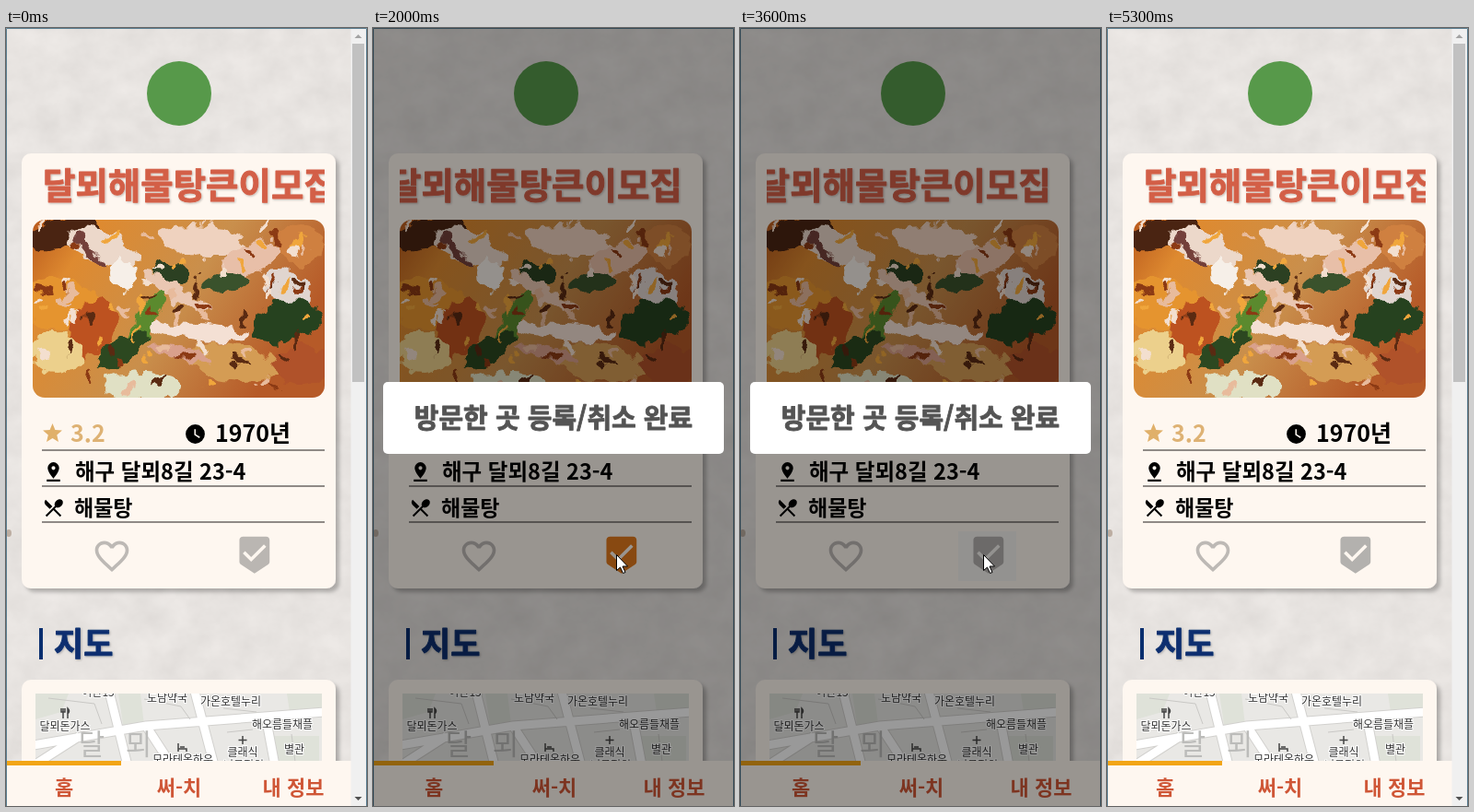
An HTML page for the animation above (5.4 s loop, 392 px wide and 844 px high).

```html
<!DOCTYPE html>
<html lang="ko">
<head>
<meta charset="utf-8">
<title>가게 정보</title>
<style>
  html, body { margin: 0; width: 100%; height: 100%; overflow: hidden; }
  svg { display: block; }
  text { font-family: "Noto Sans CJK KR", "Noto Sans CJK", "Noto Sans CJK JP", sans-serif; font-weight: 700; }
  .heavy { font-weight: 900; stroke: currentColor; fill: currentColor; stroke-width: .9px; stroke-linejoin: round; }
  .mid { text-anchor: middle; }
  .map text { font-size: 12px; font-weight: 500; text-anchor: middle; fill: #333; paint-order: stroke; stroke: #fff; stroke-width: 2px; }
  .map .district { font-size: 31px; font-weight: 400; fill: #bcbcba; stroke: none; }
  .tab { font-size: 22px; fill: #cf5636; }
  #modal { transform-origin: 196px 423px; }
</style>
</head>
<body>
<svg width="392" height="844" viewBox="0 0 392 844">
  <defs>
    <filter id="paper" x="0" y="0" width="1" height="1" color-interpolation-filters="sRGB">
      <feTurbulence type="fractalNoise" baseFrequency=".03 .035" numOctaves="5" seed="8"/>
      <feColorMatrix values=".07 0 0 0 .872  .07 0 0 0 .857  .07 0 0 0 .845  0 0 0 0 1"/>
    </filter>
    <filter id="soft" x="-.05" y="-.05" width="1.1" height="1.1" color-interpolation-filters="sRGB">
      <feTurbulence type="fractalNoise" baseFrequency=".07" numOctaves="2" seed="3"/>
      <feDisplacementMap in="SourceGraphic" scale="20" xChannelSelector="R" yChannelSelector="G"/>
      <feGaussianBlur stdDeviation=".7"/>
    </filter>
    <filter id="shade" x="-.1" y="-.1" width="1.2" height="1.2">
      <feDropShadow dx="4" dy="4" stdDeviation="2" flood-opacity=".25"/>
    </filter>
    <filter id="glow" x="-.1" y="-.2" width="1.2" height="1.5">
      <feDropShadow dx="1" dy="1" stdDeviation=".8" flood-opacity=".25"/>
    </filter>
    <linearGradient id="broth" x2="1" y2=".4">
      <stop stop-color="#b9591c"/><stop offset=".2" stop-color="#de8a30"/>
      <stop offset=".6" stop-color="#c98f4c"/><stop offset="1" stop-color="#b65a28"/>
    </linearGradient>
    <clipPath id="titleClip"><rect x="29" y="140" width="317" height="62"/></clipPath>
    <clipPath id="photoClip"><rect x="29" y="208" width="317" height="193" rx="13"/></clipPath>
    <clipPath id="mapClip"><rect x="32" y="722" width="311" height="122"/></clipPath>
  </defs>

  <rect width="392" height="844" filter="url(#paper)"/>
  <ellipse cx="3" cy="548" rx="3" ry="4" fill="#a08a78" opacity=".6"/>
  <circle cx="188" cy="71" r="35" fill="#57994a"/>

  <g fill="#fef7f0" filter="url(#shade)">
    <rect x="17" y="136" width="341" height="472" rx="10"/>
    <rect x="17" y="707" width="341" height="180" rx="10"/>
  </g>

  <g clip-path="url(#titleClip)">
    <text id="title" class="heavy" x="29" y="185" font-size="38.500" color="#d35f47" filter="url(#glow)">달뫼해물탕큰이모집</text>
  </g>

  <g clip-path="url(#photoClip)">
    <rect x="29" y="208" width="317" height="193" fill="url(#broth)"/>
    <g id="food" filter="url(#soft)"></g>
  </g>

  <g fill="#8f8a86">
    <rect x="39" y="457" width="307" height="2"/>
    <rect x="39" y="496" width="307" height="2"/>
    <rect x="39" y="535" width="307" height="2"/>
  </g>
  <g id="icons"></g>
  <text x="70" y="449" font-size="25" fill="#deb274">3.2</text>
  <text x="227" y="449" font-size="25">1970년</text>
  <text x="75" y="490" font-size="23.500">해구 달뫼8길 23-4</text>
  <text x="74" y="529" font-size="23">해물탕</text>

  <rect id="hover" x="237" y="546" width="63" height="54" fill="#f5f2ef"/>
  <path id="badge" transform="translate(248 550) scale(1.82)" d="M19 1H5c-1.1 0-2 .9-2 2v12.9c0 .7.4 1.3.9 1.7L12 23l8.1-5.4c.5-.4.9-1 .9-1.7V3c0-1.1-.9-2-2-2zm-9 15l-5-5 1.4-1.4 3.6 3.6 7.6-7.6L19 7l-9 9z"/>

  <rect x="36" y="651" width="4" height="34" fill="#0a2f6f"/>
  <text class="heavy" x="52" y="681" font-size="35" color="#0a2f6f" filter="url(#glow)">지도</text>

  <g class="map" clip-path="url(#mapClip)">
    <rect x="32" y="722" width="311" height="122" fill="#e9e8e5"/>
    <path fill="#dfe2d9" d="M32 722h36l-8 20-28 8zM305 722h38v18l-34 8zM122 722h24l4 34-22 6zM290 768h50v28h-44z"/>
    <g fill="none" stroke="#d2d1ce" stroke-width="11">
      <path id="roads" d="M30 778L152 757L345 742M112 720L132 800M205 720L226 800M152 757L180 800M282 747L292 800M30 800L80 768"/>
    </g>
    <use href="#roads" fill="none" stroke="#fff" stroke-width="9"/>
    <path fill="none" stroke="#c9c8c5" d="M46 727l50 6 8 22M150 728l40 8 10 14M236 738l36 4M240 764l28-3M310 766l4 30"/>
    <text class="district" x="93" y="788">달</text>
    <text class="district" x="144" y="788">뫼</text>
    <text x="100" y="725">여관15</text>
    <text x="175" y="731">도담약국</text>
    <text x="244" y="735">가온호텔누리</text>
    <text x="64" y="762">달뫼돈가스</text>
    <text x="300" y="760">해오름들채플</text>
    <text x="313" y="787">별관</text>
    <text x="257" y="790">클래식</text>
    <text x="192" y="798">모라테온하우</text>
    <text x="258" y="804">너른정원</text>
    <path fill="none" stroke="#444" stroke-width="1.500" d="M60 738v4h4v-4M62 738v11M67 749v-11q3 3 0 6M187 776v9M187 782h9v3M189 780h5M257 768v9M252.500 772.500h9"/>
  </g>

  <rect y="795" width="392" height="49" fill="#fef7f0"/>
  <rect id="mark" y="795" width="125" height="5" fill="#f2a516"/>
  <text class="tab mid" x="63" y="832">홈</text>
  <text class="tab mid" x="188" y="832">써-치</text>
  <text class="tab mid" x="312" y="832">내 정보</text>

  <g id="scrollbar">
    <rect x="374.500" width="17" height="844" fill="#f0f0f0"/>
    <rect x="376" y="17" width="13" height="367" fill="#c1c1c1"/>
    <path fill="#a3a3a3" d="M378.500 11l4-4 4 4z"/>
    <path fill="#505050" d="M378.500 834l4 4 4-4z"/>
  </g>
  <path fill="none" stroke="#5b7f92" d="M.5 844V.5H391.500V844"/>

  <rect id="dim" width="392" height="844" fill-opacity=".4"/>
  <g id="modal">
    <rect x="11" y="384" width="370" height="78" rx="5" fill="#fff"/>
    <text class="heavy mid" x="196" y="434" font-size="29" color="#545454">방문한 곳 등록/취소 완료</text>
  </g>

  <g fill="#fff" stroke="#000" stroke-linejoin="round">
    <path id="hand" d="M269 585V573.500q0-2 2-2t2 2v7q3.500-1 4 1 3-1 3.500 1 3-.5 3 2v5q0 3-2 6.500h-9q-2-5-6.500-9-1.500-3 1-3zM273 580v5M277 581v4M280.500 582v3"/>
    <path id="arrow" d="M264.500 571.500v17l4-3.500 3 6.500 2.500-1-3-6.500h5.500z"/>
  </g>
</svg>

<script>
const LOOP = 5400;
const OPENINGS = [[1400, 2350], [3200, 4150]];
const $ = id => document.getElementById(id);

function add(parent, tag, attrs) {
  const el = document.createElementNS(parent.namespaceURI, tag);
  for (const key in attrs) el.setAttribute(key, attrs[key]);
  parent.append(el);
}

const addFood = (cx, cy, rx, ry, angle, fill) =>
  add($("food"), "ellipse", { cx, cy, rx, ry, fill, transform: `rotate(${angle} ${cx} ${cy})` });

// Ellipses: x, y, rx, ry, angle, colour
[
  [60, 300, 44, 28, 10, "#e5942f"], [62, 222, 40, 16, -20, "#4a2412"],
  [95, 325, 24, 34, 24, "#bd5220"], [55, 352, 28, 22, 0, "#ecd08c"],
  [105, 238, 42, 17, 20, "#ecd8ca"], [90, 240, 26, 5, 50, "#74403a"],
  [127, 268, 15, 16, 0, "#f6efe8"], [215, 232, 48, 18, 8, "#efd2bf"],
  [265, 250, 34, 16, -25, "#e8bfa8"], [178, 265, 20, 12, 20, "#2c4022"],
  [320, 235, 26, 22, 0, "#cf8040"], [305, 282, 28, 18, 30, "#e0d5cf"],
  [185, 288, 44, 9, 30, "#eac7b2"], [238, 275, 24, 10, -15, "#3a522c"],
  [148, 322, 11, 44, 32, "#5b8a2e"], [125, 350, 32, 13, -35, "#2c4820"],
  [305, 318, 40, 22, -15, "#26421f"], [320, 365, 32, 22, 0, "#b0522a"],
  [245, 362, 48, 20, 8, "#d49c54"], [208, 330, 52, 10, 4, "#f4e0d4"],
  [190, 353, 34, 7, 12, "#d9a08c"], [150, 388, 44, 16, 0, "#e0e0c4"]
].forEach(shape => addFood(...shape));

// Small loose pieces in the broth
let seed = 11;
const random = () => (seed = seed * 16807 % 2147483647) / 2147483647;
const bits = ["#f3dfcf", "#8c3a14", "#f0a63c", "#5a2a12", "#e8bb9c"];
for (let i = 0; i < 70; i++)
  addFood(35 + random() * 305, 214 + random() * 180, 4 + random() * 7, 2 + random() * 2, random() * 180, bits[i % bits.length]);

// Icons on a 24-unit grid: x, y, size, colour, path
[
  [38, 427, 25, "#e0b06a", "M12 17.300l6.200 3.700-1.600-7L22 9.200l-7.200-.6L12 2 9.200 8.600 2 9.200l5.500 4.800-1.700 7z"],
  [193, 428, 25, "#000", "M12 2a10 10 0 100 20 10 10 0 000-20zm4.200 14.200L11 13V7h1.500v5.200l4.500 2.700z"],
  [39, 469, 25, "#000", "M18 8A6 6 0 006 8c0 4.500 6 11 6 11s6-6.500 6-11zm-8 0a2 2 0 114 0 2 2 0 01-4 0zM5 20v2h14v-2z"],
  [39, 508, 25, "#000", "M8.100 13.300l2.800-2.800-7-7a4 4 0 000 5.700zm6.800-1.800c1.500.7 3.700.2 5.300-1.400 1.900-1.900 2.300-4.600.8-6.100s-4.200-1.100-6.100.8c-1.600 1.600-2.100 3.800-1.400 5.300l-9.800 9.800 1.400 1.400 6.900-6.900 6.900 6.900 1.400-1.400-6.900-6.900z"],
  [93, 551, 44, "#bdb9b5", "M16.500 3c-1.700 0-3.400.8-4.500 2.100C10.900 3.800 9.200 3 7.500 3 4.400 3 2 5.400 2 8.500c0 3.800 3.400 6.900 8.600 11.500l1.400 1.300 1.400-1.300C18.600 15.400 22 12.300 22 8.500 22 5.400 19.600 3 16.500 3zm-4.400 15.500l-.1.100-.1-.1C7.100 14.200 4 11.400 4 8.500 4 6.500 5.500 5 7.500 5c1.500 0 3 1 3.600 2.400h1.900C13.500 6 15 5 16.500 5c2 0 3.500 1.500 3.500 3.500 0 2.900-3.100 5.700-7.900 10z"]
].forEach(([x, y, size, fill, d]) =>
  add($("icons"), "path", { d, fill, transform: `translate(${x} ${y}) scale(${size / 24})` }));

// Plays a table of [ms, properties] rows
function play(el, rows) {
  const frames = rows.map(([ms, props]) => ({ offset: ms / LOOP, ...props }));
  frames.push({ ...frames.at(-1), offset: 1 });
  el.animate(frames, { duration: LOOP, iterations: Infinity });
}

// Hard changes of one property
const hold = (el, prop, rows) =>
  play(el, rows.map(([ms, value]) => [ms, { [prop]: value, easing: "step-end" }]));

const show = (el, spans) =>
  hold(el, "visibility", [[0, "hidden"], ...spans.flatMap(([on, off]) => [[on, "visible"], [off, "hidden"]])]);

const whileOpen = (el, prop, closed, open) =>
  hold(el, prop, [[0, closed], ...OPENINGS.flatMap(([on, off]) => [[on, open], [off + 100, closed]])]);

play($("title"), [
  [0, 11], [250, 11, "ease-in"], [900, 6], [1950, -12], [3500, -12], [4300, 2], [4600, 4], [5300, 11]
].map(([ms, x, easing = "linear"]) => [ms, { transform: `translateX(${x}px)`, easing }]));

const pop = (scale, opacity) => ({ transform: `scale(${scale})`, opacity });
play($("modal"), [[0, pop(.7, 0)], ...OPENINGS.flatMap(([on, off]) => [
  [on, pop(.7, 0)], [on, pop(.7, 1)], [on + 140, pop(1.05, 1)], [on + 260, pop(.95, 1)],
  [on + 340, pop(1, 1)], [off, pop(1, 1)], [off + 120, pop(.5, 0)]
])]);
play($("dim"), [[0, { opacity: 0 }], ...OPENINGS.flatMap(([on, off]) => [
  [on, { opacity: 0 }], [on + 100, { opacity: 1 }], [off, { opacity: 1 }], [off + 120, { opacity: 0 }]
])]);

whileOpen($("scrollbar"), "visibility", "visible", "hidden");
whileOpen($("mark"), "width", "125px", "131px");
document.querySelectorAll(".tab").forEach((tab, i) =>
  whileOpen(tab, "transform", "translateX(0px)", `translateX(${3 + 6 * i}px)`));

hold($("badge"), "fill", [[0, "#bab6b2"], [1500, "#e27a1c"], [3500, "#b3b1ae"]]);
show($("hover"), [[100, 1400], [2450, 4000]]);
show($("hand"), [[100, 1400], [2450, 3200], [4250, 4600]]);
show($("arrow"), [[1400, 2450], [3200, 4250]]);
</script>
</body>
</html>
```
